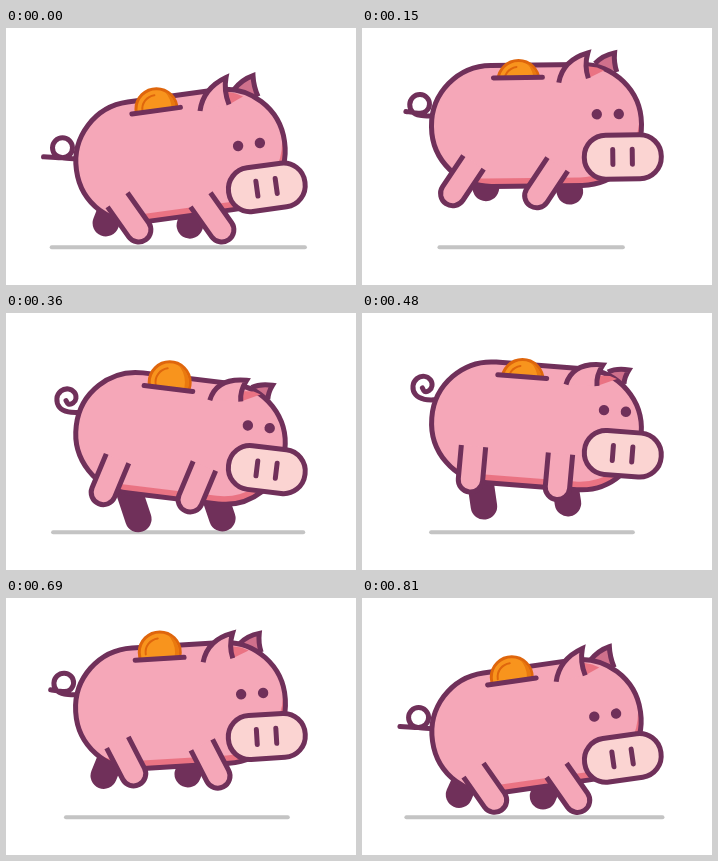
An HTML page for the animation above (0.84 s loop, 350 px wide and 257 px high).

```html
<!DOCTYPE html>
<html lang="en">
<head>
<meta charset="utf-8">
<title>Piggy bank</title>
<style>
html, body { margin: 0; width: 100%; height: 100%; overflow: hidden; background: #fff; }
svg { display: block; width: 100vw; height: 100vh; }
.ink { stroke: #70305a; stroke-width: 5; stroke-linejoin: miter; }
.skin { fill: #f5a7b8; }
.dark { stroke: #70305a; stroke-width: 26.5; stroke-linecap: round; }
</style>
</head>
<body>
<svg viewBox="0 0 350 257" fill="none">
  <defs>
    <clipPath id="trunkClip"><rect x="-105" y="-60.5" width="210" height="121" rx="60"/></clipPath>
    <clipPath id="slotClip"><rect x="-60" y="-110" width="90" height="62"/></clipPath>
  </defs>
  <path id="ground" stroke="#c4c4c4" stroke-width="4" stroke-linecap="round"/>
  <path id="dark0" class="dark"/>
  <path id="dark1" class="dark"/>
  <path id="tail" class="ink" stroke-linecap="round"/>
  <path id="backEar" class="ink" fill="#d0708c"/>
  <g id="trunk">
    <g clip-path="url(#trunkClip)">
      <rect x="-105" y="-60.5" width="210" height="121" fill="#ea7383"/>
      <rect x="-114" y="-69" width="217" height="121.5" rx="60" class="skin"/>
    </g>
    <rect x="-105" y="-60.5" width="210" height="121" rx="60" class="ink"/>
  </g>
  <path id="earShade" fill="#ea7383"/>
  <path id="ear" class="ink skin"/>
  <g id="top">
    <g clip-path="url(#slotClip)">
      <g id="coin">
        <circle r="20.5" fill="#f8941d" stroke="#df660c" stroke-width="3"/>
        <path d="M8-18A20 20 0 0 1 8 18A26 26 0 0 0 8-18Z" fill="#e9790f"/>
        <path d="M-14 2A14 14 0 0 1-2-14" stroke="#df660c" stroke-width="2" stroke-linecap="round"/>
      </g>
    </g>
    <path d="M-42.5-48H6.5" class="ink" stroke-linecap="round"/>
  </g>
  <path id="leg0" class="ink skin"/>
  <path id="leg1" class="ink skin"/>
  <g id="eyes" fill="#70305a"><circle cx="-11" r="5.2"/><circle cx="11" r="5.2"/></g>
  <g id="snout" class="ink" stroke-linecap="round">
    <rect x="-38.5" y="-22" width="77" height="44" rx="21.5" fill="#fbd4d2"/>
    <path d="M-10-7.5V7.5M9.5-7.5V7.5"/>
  </g>
</svg>
<script>
const LOOP = 840, HOP = LOOP / 2, STEP = 30, KICK = 170;
const { PI, sin, cos } = Math;
const el = id => document.getElementById(id);
const setPath = (id, d) => el(id).setAttribute('d', d);
const place = (id, x, y, r = 0) => el(id).setAttribute('transform', `translate(${x} ${y}) rotate(${r})`);
const mix = (a, b, k) => a + (b - a) * k;

// runs ahead early in a 0..1 phase, so a rise is quicker than the fall
const rush = (p, amount, power) => p + amount * sin(PI * p) * (1 - p) ** power;

// catmull-rom through points
function smooth(p) {
  let d = `M${p[0]}`;
  for (let i = 0; i < p.length - 1; i++) {
    const a = p[i - 1] || p[i], b = p[i], c = p[i + 1], e = p[i + 2] || c;
    d += `C${b[0] + (c[0] - a[0]) / 6} ${b[1] + (c[1] - a[1]) / 6} `
      + `${c[0] - (e[0] - b[0]) / 6} ${c[1] - (e[1] - b[1]) / 6} ${c}`;
  }
  return d;
}

function leg(id, hx, hy, fx, fy) {
  const len = Math.hypot(fx - hx, fy - hy), r = 12.2;
  const nx = (fy - hy) / len * r, ny = (hx - fx) / len * r;
  setPath(id, `M${hx + nx} ${hy + ny}L${fx + nx} ${fy + ny}A${r} ${r} 0 0 1 ${fx - nx} ${fy - ny}L${hx - nx} ${hy - ny}`);
}

// a loop with a loose end that winds into a spiral
function tail(x, y, k) {
  const pts = [[x, y]];
  for (let i = 0; i <= 8; i++) {
    const u = i / 8, a = PI * (.5 + 2 * u), r = mix(10, 13.5 - 8 * u, k);
    pts.push([x - 14 + 3 * k + r * cos(a), y - 11 - 3 * k + r * sin(a)]);
  }
  pts.push([x + mix(-33, -13, k), y + mix(-2, -12, k)]);
  setPath('tail', smooth(pts));
}

function ears(x, y, k) {
  const at = (px, py, dx, dy) => [x + px + k * dx, y + py + k * dy];
  const left = at(-49, -33.5, 0, 7), tip = at(-23, -67, 11, 21), right = at(-20, -40, 2, 15);
  const b0 = at(-15, -55, 8, 16), b1 = at(4, -69, 10, 28), b2 = at(9, -48, 0, 21);
  const inner = [(tip[0] + right[0]) / 2 - 4, (tip[1] + right[1]) / 2];
  setPath('ear', `M${left}Q${left[0] + 3 + 4 * k} ${tip[1] + 11 - 14 * k} ${tip}Q${inner} ${right}`);
  setPath('backEar', `M${b0}Q${(b0[0] + b1[0]) / 2 - 2} ${(b0[1] + b1[1]) / 2 - 3} ${b1}`
    + `Q${(b1[0] + b2[0]) / 2 - 2} ${(b1[1] + b2[1]) / 2} ${b2}`);
  setPath('earShade', `M${right}L${inner}L${b0[0] + 2} ${b0[1] + 4}L${b0[0] + 9} ${b0[1] + 7}Z`);
}

function draw(t) {
  const wave = lag => cos(2 * PI * (t - lag) / LOOP);
  const land = (t + 15) % LOOP, p = land % HOP / HOP;

  // body: two hops per loop, rocking to either side
  const rise = rush(p, .2, 2), hop = .5 - .5 * cos(2 * PI * rise);
  const x = 174.5, y = 128.8 - 31.8 * hop;
  const rot = 8.8 * (2 * rise - 1) * (land < HOP ? 1 : -1);
  place('trunk', x, y, rot);
  place('top', x, y, rot);
  place('coin', -17.5, -49.5 + 6.2 * sin(2 * PI * t / HOP), -rot);

  const half = 109 + 19.5 * cos(2 * PI * rush(p, .32, 1));
  const mid = 169 + (half - 90) * .09;
  setPath('ground', `M${mid - half} 219.3H${mid + half}`);

  // head and tail trail behind the body
  const curl = .52 - .52 * wave(5);
  const head = y - 4.3 * Math.max(0, wave(535)) ** 2;
  const eyeX = 243 + 10 * curl;
  place('eyes', eyeX, head - 11.3, rot);
  place('snout', 260.8, head + 31.5, rot);
  ears(eyeX, head - 11.3, curl);
  tail(70.5 + 3 * curl, y + 3 - 29 * sin(curl * PI / 2), curl);

  // front legs: fast kick back, slow swing forward
  const swing = t < KICK ? cos(PI * t / KICK) : -cos(PI * (t - KICK) / (LOOP - KICK));
  const hipX = 111.5, hipY = y + 31.5 + 12.5 * wave(0);
  const footX = 111 + 21.7 * swing, footY = y + 63.5 + 10.5 * wave(0);
  const dx = 83 + 4 * curl, dy = 7.5 * curl;
  leg('leg0', hipX, hipY, footX, footY);
  leg('leg1', hipX + dx, hipY + dy, footX + dx, footY + dy);

  const darkX = 113.5 + 19.5 * wave(315) + 4 * hop, darkY = y + 75.5 - 7 * hop + 8.5 * wave(467);
  const rootX = mix(114, darkX, .3);
  setPath('dark0', `M${rootX} ${y + 42}L${darkX} ${darkY}`);
  setPath('dark1', `M${rootX + 84} ${y + 42}L${darkX + 84} ${darkY + 3.5 * wave(117)}`);
}

const start = performance.now();
function tick(now) {
  const t = Math.max(0, now - start) % LOOP;
  draw(Math.floor(t / STEP) * STEP);
  requestAnimationFrame(tick);
}
draw(0);
requestAnimationFrame(tick);
</script>
</body>
</html>
```
